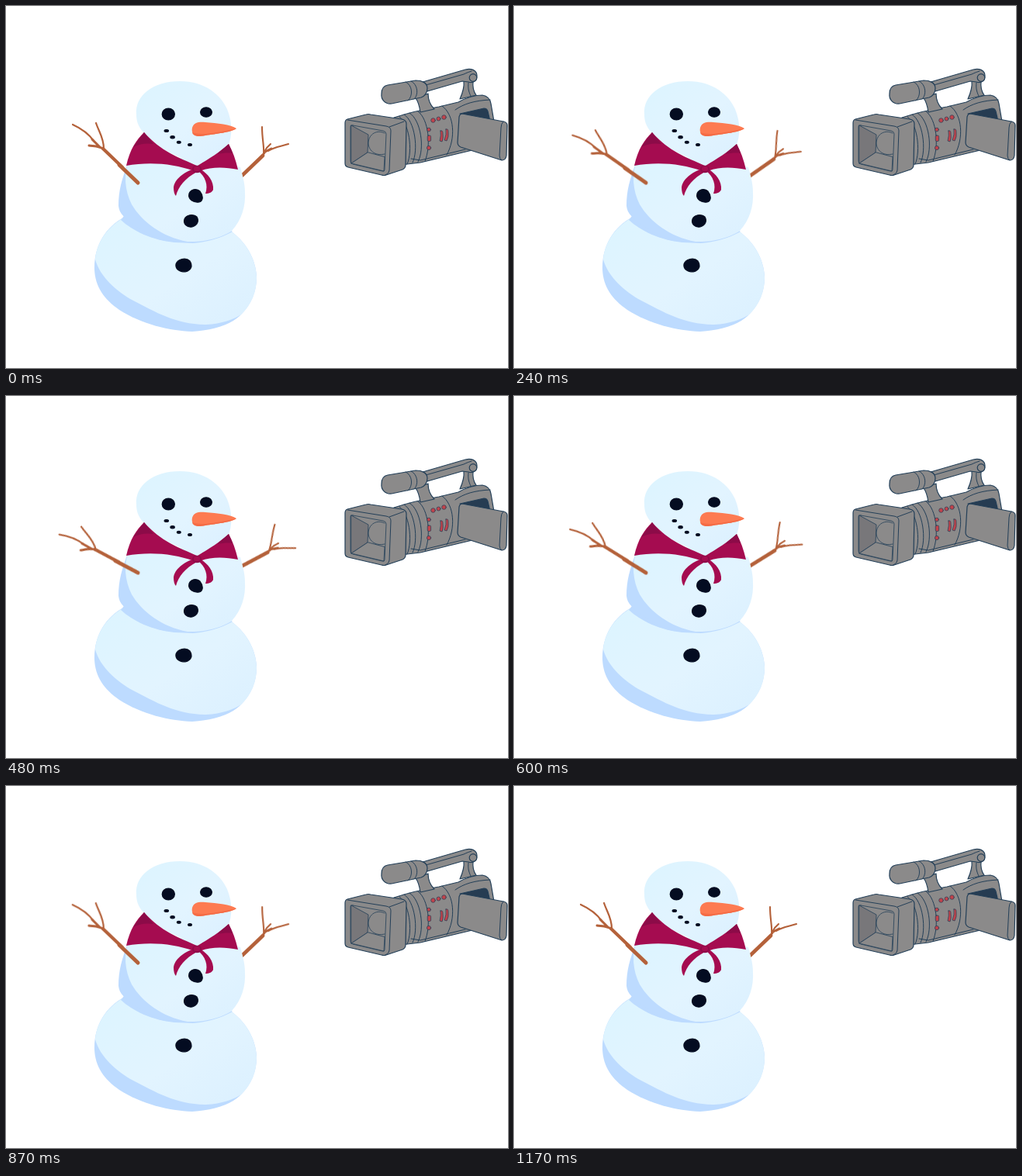
Recreate the animation shown at these times as an HTML page. Size 647x467 px, loop 1830 ms.

```html
<!DOCTYPE html>
<html lang="en">
<head>
<meta charset="utf-8">
<title>Snowman and camera</title>
<style>
  html, body { margin: 0; width: 100%; height: 100%; overflow: hidden; background: #fff; }
  svg { display: block; }
  .shade { fill: #bddbff; }
  .snow { fill: url(#snow); }
  .coal { fill: #040c21; stroke: #040c21; stroke-width: 1.2; }
  .scarf { fill: #a50c50; }
  .fold { fill: #8c0b48; }
  .twig { fill: none; stroke: #b4613a; stroke-linecap: round; stroke-linejoin: round; }
  .cam { fill: #8b8a8a; stroke: #233f58; stroke-width: 1.2; stroke-linejoin: round; stroke-linecap: round; }
  .cam .line { fill: none; stroke-width: 1; }
  .cam .dark { fill: #263c52; }
  .cam .red { fill: #c2434b; stroke-width: .7; }
  .cam .inner { stroke-width: .8; }
  #armL { transform-origin: 170px 228px; }
  #armR { transform-origin: 303px 220px; }
</style>
</head>
<body>
<svg width="647" height="467" viewBox="0 0 647 467">
  <defs>
    <linearGradient id="snow" x1="0" y1="0" x2="1" y2="1">
      <stop offset="0" stop-color="#dcf4ff"/>
      <stop offset=".55" stop-color="#e2f4ff"/>
      <stop offset="1" stop-color="#dbf0ff"/>
    </linearGradient>
  </defs>

  <!-- lower ball -->
  <path class="shade" d="M153 272C128 285 113 310 114 340C115 362 126 378 146 392C174 410 210 419 240 420C270 418 290 410 301 400C316 386 323 368 323 350C322 325 308 303 289 290Z"/>
  <path class="snow" d="M153 272C131 285 117 304 115 327C121 349 142 368 164 380C193 395 220 411 258 411C278 410 294 404 303 398C317 385 323 368 323 350C322 325 308 303 289 290L220 280Z"/>
  <path class="shade" d="M156 266L148 276C163 290 188 302 217 305L241 306C262 304 278 299 292 291L280 285Z"/>

  <!-- arm behind the body -->
  <g id="armR" class="twig">
    <path stroke-width="4.6" d="M304 219L331 193"/>
    <path stroke-width="3" d="M329 195L334 188L342 184"/>
    <path stroke-width="2.1" d="M332 191C333 181 330 172 330 156M332 190L336 183L341 178M338 187C345 182 355 181 364 178"/>
  </g>

  <!-- middle ball -->
  <path class="shade" d="M158 200C149 224 145 238 145 258C146 268 153 274 168 284C190 302 216 305 240 304L230 220Z"/>
  <path class="snow" d="M159 198C151 216 153 238 162 256C175 278 201 298 234 304C258 305 280 298 291 290C304 276 309 258 308 240C308 229 305 219 302 208L245 195Z"/>

  <!-- head -->
  <path class="snow" d="M168 140C166 115 190 97 224 97C257 97 277 115 285 133C292 150 292 168 286 181C277 196 264 201 246 203C216 193 188 180 177 163C170 155 168 148 168 140Z"/>

  <g id="armL" class="twig">
    <path stroke-width="5" d="M170 228L146 205"/>
    <path stroke-width="4.2" d="M150 208L125 184"/>
    <path stroke-width="3" d="M126 185C120 180 113 181 107 180M121 182L111 172"/>
    <path stroke-width="2.2" d="M113 174C106 164 97 158 86 153M126 184C126 170 120 163 116 151"/>
  </g>

  <!-- scarf -->
  <path class="scarf" d="M178 163C168 173 160 184 155 206C184 201 216 203 242 213L246 206C222 195 200 188 178 163Z"/>
  <path class="scarf" d="M287 178C276 188 262 197 247 206L250 213C266 207 282 208 299 211C296 198 292 187 287 178Z"/>
  <path class="fold" d="M178 163L164 182C174 177 182 177 190 178ZM287 178L272 191C279 190 285 189 292 190Z"/>
  <path class="scarf" d="M243 210C229 214 217 224 216 234C216 239 217 243 219 245C222 233 231 222 246 214ZM247 212C257 220 261 231 257 242C262 242 266 240 267 237C268 226 260 216 251 211Z"/>
  <ellipse class="fold" cx="246" cy="210.5" rx="6" ry="4.8"/>
  <ellipse class="scarf" cx="246" cy="210" rx="4.2" ry="3.2"/>

  <!-- face and buttons -->
  <g class="coal">
    <ellipse cx="209.3" cy="139.5" rx="8.1" ry="7.4"/>
    <ellipse cx="258" cy="137" rx="7.4" ry="6.2"/>
    <ellipse cx="206.8" cy="161" rx="2.7" ry="1.4"/>
    <ellipse cx="214.6" cy="169.2" rx="2.7" ry="1.6"/>
    <ellipse cx="222.8" cy="175.8" rx="2.4" ry="1.4"/>
    <ellipse cx="237" cy="179" rx="2.4" ry="1.4"/>
    <path d="M236 242C238 236 246 235 250 239C254 244 255 251 249 253C242 254 234 250 236 242Z"/>
    <path d="M230 275C232 269 242 268 246 272C249 277 247 283 240 285C233 286 228 281 230 275Z"/>
    <path d="M219 333C221 326 232 324 237 329C241 335 239 341 231 343C223 343 218 339 219 333Z"/>
  </g>
  <path fill="#fd7b52" d="M240 157C242 150 249 149 257 150C272 151 290 153 297 158C290 163 270 165 257 167C245 169 238 166 240 157Z"/>
  <path fill="#f56c45" d="M240 163C253 168 277 162 297 158C290 163 270 165 257 167C247 169 241 168 240 163Z"/>

  <!-- camera -->
  <g class="cam">
    <path d="M500 144C518 138 540 133 558 130L583 124C592 119 604 115 614 115C620 116 624 120 625 126L630 155L622 181L534 202L500 206Z"/>
    <path class="line" d="M507 143C519 150 525 186 517 204M513 140C527 148 532 186 524 202M520 138C535 147 540 184 531 201M531 136C545 146 548 181 540 200M562 129C578 140 580 171 568 192M579 134C590 126 604 122 624 121"/>
    <path class="line" d="M522 197L534 199L592 185"/>
    <path class="dark" d="M585 139L616 132Q620 132 621 136L624 149Z"/>

    <!-- handle -->
    <path d="M528 119L544 113C544 123 548 129 552 133L534 137C533 130 532 124 528 119Z"/>
    <path d="M590 97L602 97C601 106 603 111 606 115L585 120C589 111 591 105 590 97Z"/>
    <path class="line" d="M596 99C595 107 597 112 599 116"/>
    <path d="M537 98L592 82C600 80 607 83 607 90C607 97 602 100 596 98L588 97L543 110Z"/>
    <path class="line" d="M541 102L590 88C594 86 597 85 600 84"/>
    <circle cx="602" cy="92.5" r="4.8"/>
    <path d="M492 102L528 96C536 96 543 99 543 106C543 113 540 116 535 118L497 126C489 127 483 121 484 113C484 107 487 103 492 102Z"/>
    <path class="line" d="M515 98C524 102 525 116 518 122M522 97C531 101 532 115 526 120"/>

    <!-- screen -->
    <path d="M588 139L641 149Q646 150 646 154L645 193Q644 199 639 199L586 182Q582 180 582 176L584 143Q585 139 588 139Z"/>
    <path class="line" d="M641 149Q638 152 638 157L636 193Q636 197 639 199"/>

    <!-- lens hood -->
    <path d="M440 146L464 140Q467 139 470 140L510 146Q516 147 516 152L515 205Q515 209 511 211L490 218Q487 219 484 218L441 208Q437 207 437 203L437 151Q437 147 440 146Z"/>
    <path class="line" d="M440 147L490 155Q496 156 496 161L494 212Q494 216 489 218M494 156L513 149"/>
    <g class="inner">
      <path d="M447 154L486 161Q490 162 490 165L488 211Q488 214 485 213L447 204Q444 203 444 200L444 156Q444 153 447 154Z"/>
      <path fill="#78777a" d="M445 154L467 166L466 189L445 203Z"/>
      <path d="M466 189L445 203L487 213L488 195Z"/>
      <path fill="none" d="M488 164C478 159 468 165 467 176C467 186 475 194 488 191"/>
    </g>

    <!-- buttons -->
    <g class="red">
      <circle cx="550.5" cy="147.5" r="2.8"/>
      <circle cx="557.5" cy="145.5" r="2.5"/>
      <circle cx="564.5" cy="143.5" r="2.8"/>
      <circle cx="545" cy="159.5" r="2.4"/>
      <rect x="543.2" y="167" width="4.4" height="7.5" rx="1.5"/>
      <circle cx="545" cy="183" r="2.6"/>
      <path d="M560 161Q563 160 563 164Q564 171 562 175L559 174Q561 167 560 161ZM567 159Q570 158 570 162Q571 169 568 174L565 173Q568 166 567 159Z"/>
    </g>
  </g>
</svg>
<script>
  const LOOP = 1830, STEP = 30, WAVE = 900, SWING = 16;

  // One smooth dip and return, then rest until the loop ends.
  const angle = t => t < WAVE ? SWING * (1 - Math.cos(2 * Math.PI * t / WAVE)) / 2 : 0;

  function wave(id, dir) {
    const keys = [];
    for (let t = 0; t <= LOOP; t += STEP)
      keys.push({ offset: t / LOOP, transform: `rotate(${dir * angle(t)}deg)`, easing: 'step-end' });
    document.getElementById(id).animate(keys, { duration: LOOP, iterations: Infinity });
  }

  wave('armL', -1);
  wave('armR', 1);
</script>
</body>
</html>
```
